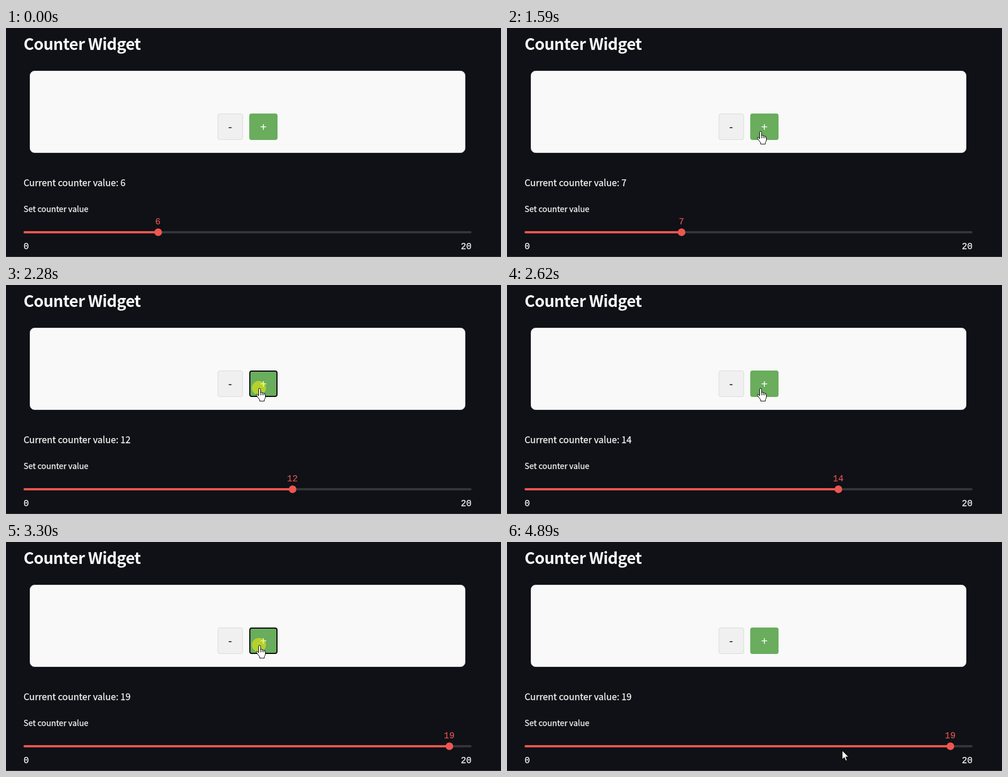
Recreate the animation shown at these times as an HTML page. Size 875x407 px, loop 5.09 s.

```html
<!DOCTYPE html>
<html lang="en">
<head>
<meta charset="utf-8">
<title>Counter Widget</title>
<style>
  html, body { margin: 0; width: 100%; height: 100%; overflow: hidden; background: #0f1116; }
  svg { display: block; width: 875px; height: 407px; }
  text { fill: #fafafa; stroke: #fafafa; stroke-width: .25px; font-family: "Noto Sans CJK JP", "Noto Sans CJK SC", "Noto Sans CJK", "Open Sans", sans-serif; }
  .title { font-size: 28.2px; font-weight: 700; letter-spacing: -0.58px; stroke: none; }
  .body { font-size: 16.15px; }
  .label { font-size: 14.2px; }
  .mono { font: 15.75px "Liberation Mono", monospace; }
  .sign { font: 20.25px "Liberation Sans", Arial, sans-serif; text-anchor: middle; stroke: none; }
  .red { fill: #ee5650; }
  #tip { text-anchor: middle; stroke: #ee5650; stroke-width: .1px; }
  .cursor { fill: #fff; stroke: #000; stroke-width: 1; stroke-linejoin: round; }
</style>
</head>
<body>
<svg viewBox="0 0 875 407">
  <rect width="875" height="407" fill="#0f1116"/>
  <rect y="406" width="875" height="1" fill="#34363b"/>
  <text class="title" x="31" y="39">Counter Widget</text>

  <rect x="42.5" y="76.5" width="769" height="145" rx="8" fill="#f9f9f9" stroke="#ddd"/>
  <rect x="374.5" y="152.5" width="44" height="46" rx="3.5" fill="#f0f0f0" stroke="#dcdcdc"/>
  <text class="sign" x="396" y="182.5" style="fill:#111c33">-</text>
  <rect x="430" y="152" width="50" height="47" rx="4" fill="#69ad5d"/>
  <text class="sign" x="455" y="182.5" style="fill:#fff">+</text>
  <g id="press">
    <rect x="431" y="153" width="48" height="45" rx="3.5" fill="none" stroke="#0a0a0a" stroke-width="2"/>
    <circle cx="447" cy="183" r="12.5" fill="#fff500" fill-opacity=".5"/>
  </g>

  <text class="body" id="current" x="31" y="281"></text>
  <text class="label" x="31" y="327">Set counter value</text>
  <rect x="31" y="361" width="792" height="4" rx="2" fill="#33353b"/>
  <rect class="red" id="fill" x="31" y="361" height="4" rx="2"/>
  <circle class="red" id="thumb" cy="363" r="6.75"/>
  <text class="mono red" id="tip" y="349"></text>
  <text class="mono" x="31" y="393">0</text>
  <text class="mono" x="823" y="393" text-anchor="end">20</text>

  <path class="cursor" id="arrow" d="M.5 .5V16.5L4.2 13L6.8 19L9.3 18L6.8 12H11.8Z"/>
  <g class="cursor" id="hand" transform="translate(441 183)">
    <path d="M5.5 14V2.5Q5.5 .7 7.2 .7Q9 .7 9 2.5V8.5Q9 7.5 10.3 7.5Q12 7.5 12 9.3Q12.3 8.3 13.5 8.5Q14.8 8.8 14.8 10.3Q15.2 9.5 16.2 9.8Q17.5 10.2 17.5 12V16Q17.5 18.5 15.7 20.5V23.3H7.5V21Q5 18 2 13.8Q.8 12 2 11.3Q3.3 10.8 5.5 14Z"/>
    <path fill="none" d="M9 8.5V13M12 9.3V13M14.8 10.3V13"/>
  </g>
</svg>
<script>
const LOOP = 5090, STEP = 67, STEPS = 7;
const HOVER = 1220, LEAVE = 3640;
const FIRST_CLICK = 1450, BEAT = 140, RAPID = 1710, RAPID_CLICKS = 12, PRESS = 60;

const $ = id => document.getElementById(id);
const [press, current, fill, thumb, tip, arrow, hand] =
  ["press", "current", "fill", "thumb", "tip", "arrow", "hand"].map($);

// Each arrow move is a quadratic curve, eased out in short steps
const moves = [
  { at: 120, from: [702, 373], bend: [430, 275], to: [229, 364] },
  { at: 670, from: [229, 364], bend: [349, 262], to: [444, 187] },
  { at: LEAVE, from: [450, 186], bend: [816, 250], to: [723, 353] },
  { at: 4200, from: [723, 353], bend: [680, 405], to: [592, 370] }
];

function arrowAt(t) {
  const { at, from, bend, to } = moves.filter(m => m.at <= t).pop();
  const done = Math.min(STEPS, Math.floor((t - at) / STEP)) / STEPS;
  const u = Math.sin(done * Math.PI / 2), v = 1 - u;
  return from.map((p, i) => Math.round(v * v * p + 2 * u * v * bend[i] + u * u * to[i]));
}

const show = (el, on) => el.setAttribute("visibility", on ? "visible" : "hidden");

function draw(t) {
  // One single click, then a run of quick ones on a steady beat
  const beats = Math.floor((t - RAPID) / BEAT) + 1;
  const value = 6 + (t >= FIRST_CLICK) + Math.max(0, Math.min(RAPID_CLICKS - 0, beats));
  const pressed = beats >= 1 && beats <= RAPID_CLICKS && (t - RAPID) % BEAT < PRESS;
  const x = 31 + 792 * value / 20;

  current.textContent = "Current counter value: " + value;
  tip.textContent = value;
  tip.setAttribute("x", x);
  thumb.setAttribute("cx", x + 0.4);
  fill.setAttribute("width", x - 31);
  show(press, pressed);

  const onButton = t >= HOVER && t < LEAVE;
  const onStage = t >= moves[0].at;
  show(hand, onButton);
  show(arrow, onStage && !onButton);
  if (onStage) arrow.setAttribute("transform", `translate(${arrowAt(t)})`);
}

const begin = performance.now();
function tick() {
  draw((performance.now() - begin) % LOOP);
  requestAnimationFrame(tick);
}
tick();
</script>
</body>
</html>
```
